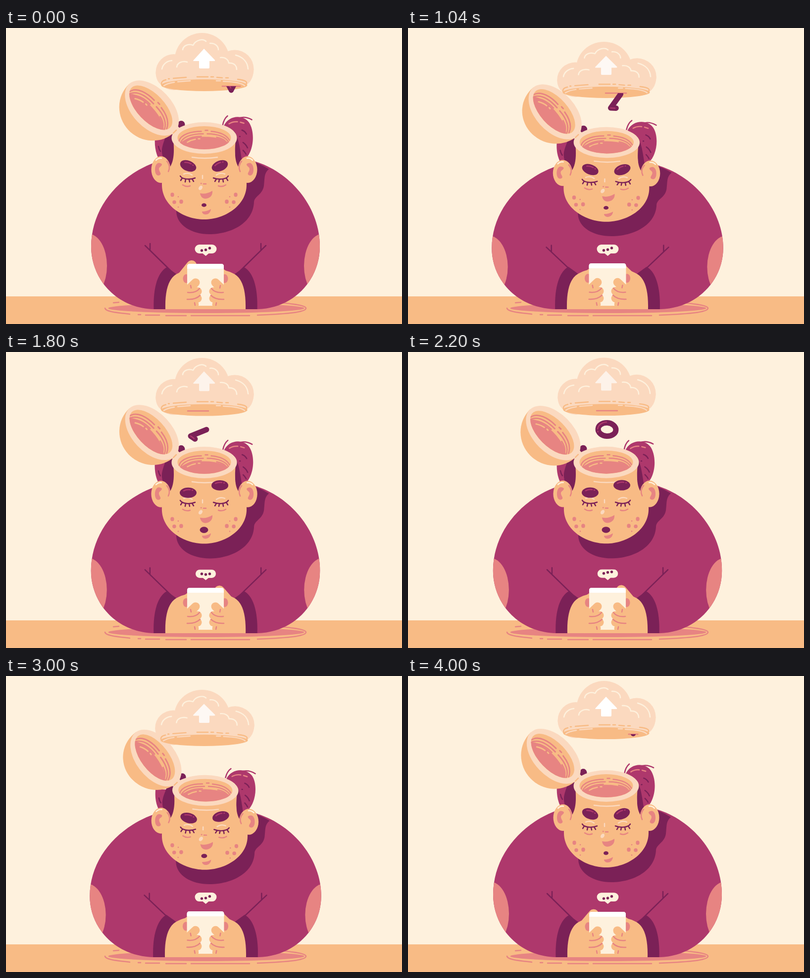
An HTML page that plays this animation: 800 px wide and 600 px high, repeating every 4040 ms.

```html
<!DOCTYPE html>
<html lang="en">
<head>
<meta charset="utf-8">
<title>Cloud thoughts</title>
<style>
html, body { margin: 0; width: 100%; height: 100%; overflow: hidden; background: #fef1dd }
svg { display: block; width: 100vw; height: 100vh }
.skin { fill: #f8bb85 } .pale { fill: #fbd9bf } .cream { fill: #fef1dd }
.pink { fill: #e78482 } .plum { fill: #ae386c } .dark { fill: #7b2157 }
.line { fill: none; stroke-width: 2.5; stroke-linecap: round; stroke-linejoin: round }
.thick { stroke-width: 11 } .finger { stroke-width: 17 } .thumb { stroke-width: 21 }
.s-skin { stroke: #f8bb85 } .s-pale { stroke: #fbd9bf } .s-cream { stroke: #fef1dd }
.s-pink { stroke: #e78482 } .s-plum { stroke: #ae386c } .s-dark { stroke: #7b2157 }
</style>
</head>
<body>
<svg viewBox="0 0 800 600">
<defs>
  <path id="torso" d="M299 570C222 568 172 508 172 443C172 360 235 290 318 267H490C570 285 634 360 634 443C634 508 584 568 508 570Z"/>
  <clipPath id="torsoClip"><use href="#torso"/></clipPath>
  <clipPath id="bowlClip"><ellipse rx="54" ry="23.5"/></clipPath>
  <clipPath id="dropClip">
    <rect id="air" width="800"/>
    <ellipse id="opening" cx="400.5" rx="54" ry="23"/>
  </clipPath>
  <g id="bowl">
    <ellipse class="skin" rx="54" ry="23.5"/>
    <g clip-path="url(#bowlClip)">
      <ellipse class="pink" cy="16" rx="51" ry="18"/>
      <path class="line s-pink" d="M-51 7C-48-7-26-13-6-13M2-15H7M14-13C36-11 46-4 51 5M-48 10C-42-3-24-8-2-8M6-8C29-8 44-1 49 9M-44 11C-38 2-22-3-6-3M25-1C36 1 42 5 45 10"/>
      <path class="line s-skin" d="M-34 9C-29 6-24 4-18 3M-12 2H-9"/>
    </g>
  </g>
  <g id="ear">
    <ellipse class="skin" cx="313" cy="287" rx="19.5" ry="27"/>
    <path class="pink" d="M315 276C306 269 301 278 301 287C301 297 306 301 311 298C315 295 309 291 309 286C309 281 315 281 315 276Z"/>
    <path class="line s-pink" d="M325 270C331 277 331 285 328 291"/>
    <path class="line s-cream" d="M303 268Q308 263 314 264"/>
  </g>
  <g id="eye">
    <path class="line s-dark" d="M352 300C356 307 372 308 382 304M356 304L353 309M363 306L362 312M370 307L371 312M376 306L379 311"/>
    <path class="line s-pale" d="M359 296Q368 292 376 298"/>
    <path class="line s-pink" d="M357 318Q364 323 372 320"/>
  </g>
  <g id="brow">
    <ellipse class="dark" rx="17" ry="10.5"/>
    <path class="line s-plum" d="M-9-4Q-3-7 4-6M8-5H9"/>
  </g>
  <g id="freckles" class="pink">
    <ellipse cx="336" cy="338" rx="3.7" ry="4.2"/><circle cx="340" cy="353" r="3.8"/>
    <ellipse cx="354" cy="352" rx="3.8" ry="4.2"/><circle cx="348" cy="342" r="1.3"/><circle cx="348" cy="363" r="1.3"/>
  </g>
  <g id="sleeve">
    <path class="dark" d="M298.5 570C297 528 306 495 325 485L350 503V570Z"/>
    <path class="skin" d="M322 570C321 530 329 505 348 497C356 493 363 491 372 490V563H403V570Z"/>
  </g>
  <g id="fingers">
    <path class="line finger s-skin" d="M358 540L383 516M358 549L387 534M358 553L387 548M358 561L381 560"/>
    <path class="line s-pink" d="M367 536Q383 538 391 528M366 550Q383 551 392 542M373 522L374 527M381 557L382 562"/>
  </g>
  <g id="drop0">
    <path class="dark" d="M-17-13H17L4 12Q0 16-4 12Z"/>
    <path class="line s-plum" d="M-7-7L-1 4"/>
  </g>
  <g id="drop1">
    <ellipse class="line thick s-dark" rx="13.5" ry="18"/>
    <path class="line s-plum" d="M-15 2C-14 11-8 18 0 19M5 18H6"/>
  </g>
  <g id="drop2">
    <path class="line thick s-dark" d="M17-9L-15 4L-6 10"/>
    <path class="line s-plum" d="M-15 4L-8 9"/>
  </g>
</defs>

<rect class="cream" width="800" height="600"/>
<rect class="skin" y="544" width="800" height="56"/>
<ellipse class="pink" cx="404.5" cy="568" rx="198" ry="10"/>
<path class="line s-pink" d="M200 568C201 575 225 577 250 580M267 581H272M282 582H310M323 583H364M374 583H492M508 582C560 580 606 577 606 568C606 562 580 559 545 556M217 557L228 556"/>

<g id="body">
  <use href="#torso" class="plum"/>
  <g class="pink" clip-path="url(#torsoClip)">
    <ellipse cx="166" cy="482" rx="38" ry="65"/><ellipse cx="640" cy="482" rx="38" ry="65"/>
  </g>
  <path class="dark" d="M344 372C345 400 375 418 411 418C455 418 500 395 501 352C503 340 518 338 521 320C523 303 521 295 531 286C515 276 500 270 480 266L344 300Z"/>
  <path class="line s-dark" d="M281 441L342 501M291 437V450M525 441L463 502M515 437V450"/>
  <g id="head">
    <g id="hair">
      <path class="plum" d="M440 199C450 176 479 175 491 191C503 208 502 246 485 264L472 272L462 215Z"/>
      <path class="line s-plum" d="M438 197C440 187 443 182 448 178M468 184C478 179 488 181 497 186"/>
      <path class="line s-pink" d="M451 194Q459 189 468 190M474 191L481 193"/>
      <path class="line s-dark" d="M477 207Q483 209 486 215M472 220H473M479 232Q485 236 488 243M479 248Q483 252 485 256"/>
    </g>
    <path class="dark" d="M460 208C470 222 472 240 476 265L478 282H464Z"/>
    <path class="plum" d="M301 222C299 248 306 270 325 284L340 280V222Z"/>
    <path class="dark" d="M340 215V275L331 284C322 275 314 262 315 246C316 236 321 226 324 215Z"/>
    <path class="line s-dark" d="M308 240Q309 246 312 250"/>
    <ellipse class="dark" cx="354" cy="196" rx="7.5" ry="8"/>
    <g id="lid">
      <g transform="translate(295 162) rotate(47)">
        <path class="skin" d="M-67 0A67 65 0 0 0 67 0Z"/>
        <ellipse class="pale" rx="67" ry="40"/>
        <use href="#bowl" transform="translate(-2 1) scale(1.04 1.18)"/>
      </g>
    </g>
    <path class="skin" d="M338 225C340 250 340 270 330 284L315 305V318C315 360 359 388 400.5 388C442 388 486 360 486 318V305L471 284C461 270 462 250 464 225Z"/>
    <use href="#ear"/><use href="#ear" transform="matrix(-1 0 0 1 801 0)"/>
    <path class="pale" d="M331 207L347 199L360 212L343 224Z"/>
    <ellipse class="pale" cx="400.5" cy="223" rx="66" ry="32"/>
    <path class="line s-skin" d="M338 213L344 207"/>
    <use href="#bowl" x="400.5" y="222.5"/>
    <path class="line s-pale" d="M376 262Q401 266 427 262"/>
    <use href="#eye"/><use href="#eye" transform="matrix(-1 0 0 1 801 0)"/>
    <use href="#freckles"/><use href="#freckles" transform="matrix(-1 0 0 1 800 0)"/>
    <use id="browL" href="#brow"/><use id="browR" href="#brow"/>
    <path class="line s-pale" d="M397 299V305"/>
    <path class="line s-pink" d="M394 315H394.5M399 316H404"/>
    <ellipse class="pale" transform="translate(393 324) rotate(35)" rx="3.5" ry="5"/>
    <path class="pink" d="M392 335Q404 338 417 330C418 341 410 346 402 346C396 345 393 341 392 335Z"/>
    <ellipse id="mouth" class="dark" cx="400"/>
    <path class="pink" d="M396 372Q406 372 414 367C413 375 408 378 403 378C399 378 396 375 396 372Z"/>
  </g>
</g>

<g id="arms">
  <use href="#sleeve"/><use href="#sleeve" transform="matrix(-1 0 0 1 806 0)"/>
  <path id="thumbL" class="line thumb s-skin"/>
  <path id="thumbR" class="line thumb s-skin"/>
  <ellipse class="pink" cx="364" cy="508" rx="6.5" ry="9"/><ellipse class="pink" cx="442" cy="508" rx="6.5" ry="9"/>
  <rect class="cream" x="366" y="478" width="74" height="85" rx="5"/>
  <path fill="#fff" d="M366 488V483Q366 478 371 478H435Q440 478 440 483V488Z"/>
  <use href="#fingers"/><use href="#fingers" transform="matrix(-1 0 0 1 806 0)"/>
</g>

<g id="bubble">
  <path class="cream" d="M-13-9H13A9 9 0 0 1 13 9H6L0 14L-6 9H-13A9 9 0 0 1-13-9Z"/>
</g>
<g id="dots" class="dark"><circle r="2.7"/><circle r="2.7"/><circle r="2.7"/></g>

<g id="cloud">
  <g class="pale">
    <circle cx="396" cy="65.5" r="55.5"/><circle cx="339" cy="89.5" r="36.5"/><circle cx="462" cy="83" r="38.5"/>
    <path d="M302.5 90C303 108 311 118 330 121H472C492 117 500 102 500.5 83L420 60H370Z"/>
  </g>
  <ellipse class="skin" cx="400.5" cy="116" rx="87" ry="12"/>
  <path class="line s-skin" d="M314 114Q313 107 323 105M328 103H330M338 102L364 100M386 99H408M414 99H419M426 100L437 101M444 101H449M468 104C486 106 488 110 485 114"/>
  <path class="line s-pale" d="M319 117Q326 112 340 110M347 109L372 107M425 107H433M439 108C462 109 477 112 482 117"/>
  <path class="line s-cream" d="M315 83C317 73 325 67 335 66M345 79C346 70 357 66 366 69M357 44C358 36 368 31 378 35C383 24 398 21 404 27M412 31C422 30 429 37 429 44M433 60C443 59 449 64 450 71C460 70 466 76 466 84M464 55C479 59 488 69 489 83"/>
  <path id="arrow" fill="#fff" d="M400 0L422 23Q423 25 420 25H411V38Q411 40 409 40H392Q390 40 390 38V25H380Q377 25 379 23Z"/>
</g>
<g id="slits" class="line s-pink"></g>
<g clip-path="url(#dropClip)"><g id="drops"></g></g>
</svg>

<script>
const LOOP = 4040, STEP = 40, TAU = 2 * Math.PI;
const $ = id => document.getElementById(id);
const set = (el, attrs) => { for (const k in attrs) el.setAttribute(k, attrs[k]); };
const move = (el, transform) => set(el, { transform });
const mod = (a, b) => (a % b + b) % b;
const wave = (t, cycles, peak = 0) => Math.cos(TAU * (t * cycles / LOOP - peak));
const smooth = (a, b, t) => { const u = Math.min(1, Math.max(0, (t - a) / (b - a))); return u * u * (3 - 2 * u); };
const scaleAt = (x, y, sx, sy) => `translate(${x} ${y}) scale(${sx} ${sy}) translate(${-x} ${-y})`;

// start, x, shape, strength of the lid kick, angle at start
const drops = [
  [3980, 455, 0, 13, 0], [536, 386, 1, 8, -40], [910, 420, 2, 13, -83], [1587, 388, 2, 13, -83],
  [1985, 402, 1, 13, 10], [2535, 440, 0, 13, 0], [3115, 427, 2, 13, -83], [3345, 409, 1, 5, -105]
].map(([start, x, shape, kick, angle]) => ({ start, x, shape, kick, angle }));
const IMPACT = 270, GONE = 440, BOTTOM = [14, 23.5, 14];

const make = (name, parent, attrs) => {
  const el = document.createElementNS("http://www.w3.org/2000/svg", name);
  set(el, attrs);
  return parent.appendChild(el);
};
for (const d of drops) {
  d.el = make("use", $("drops"), { href: "#drop" + d.shape });
  d.slit = make("path", $("slits"), {});
}

function lidAngle(t) {
  return drops.reduce((sum, d) => {
    const u = mod(t - d.start - IMPACT, LOOP);
    return sum + d.kick * Math.exp(-u / 260) * Math.sin(TAU * u / 600);
  }, 0);
}

function drawDrops(t, sink) {
  const slitY = 118 + 14 * sink;
  set($("air"), { y: slitY, height: 229 - slitY });
  set($("opening"), { cy: 222.5 + 9 * sink });
  for (const d of drops) {
    const u = mod(t - d.start + 60, LOOP) - 60;
    const falling = u >= 0 && u < GONE;
    d.el.style.display = falling ? "" : "none";
    if (falling) {
      const y = slitY + .2 * u + .0004 * u * u - BOTTOM[d.shape];
      const turn = d.shape ? d.angle + .39 * u : 0;
      move(d.el, `translate(${d.x} ${y}) rotate(${turn})`);
    }
    const half = 21 * smooth(-40, 90, u) * (1 - smooth(230, 310, u));
    d.slit.style.display = half > .3 ? "" : "none";
    set(d.slit, { d: `M${d.x - half} ${slitY}H${d.x + half}` });
  }
}

function draw(t) {
  const sink = (1 - wave(t, 2)) / 2;
  const wide = 1 + .012 * sink;
  const tilt = lidAngle(t);
  const awe = smooth(1050, 1350, t) * (1 - smooth(2800, 3100, t));

  move($("body"), scaleAt(403, 570, wide, 1 - .026 * sink));
  move($("arms"), scaleAt(403, 570, wide, wide));
  move($("head"), `rotate(${Math.max(0, tilt) * .13} 400 388)`);
  move($("lid"), `rotate(${tilt} 345 214)`);
  move($("hair"), `rotate(${2 * Math.tanh(tilt / 2)} 480 262)`);
  move($("browL"), `translate(368 ${279.5 + 5 * awe}) rotate(${22 * (1 - awe)})`);
  move($("browR"), `translate(432 ${279.5 - 10 * awe}) rotate(${-22 * (1 - awe)})`);
  set($("mouth"), { cy: 359 + awe, rx: 5 + 3.5 * awe, ry: 3.7 + 2.6 * awe });

  const left = Math.max(0, wave(t, 3)) ** 8;
  const right = (1 - wave(t, 3)) / 2;
  set($("thumbL"), { d: `M349 514L375 ${495.5 - 14 * left}` });
  set($("thumbR"), { d: `M456 513L431 ${495.5 - 15 * right}` });

  const puff = 1 + .035 * (wave(t, 8) - 1);
  move($("bubble"), `translate(403.5 ${448.8 - .8 * wave(t, 8)}) scale(${puff})`);
  [.45, .33, .12].forEach((peak, i) =>
    set($("dots").children[i], { cx: 395.5 + 8 * i, cy: 448.3 - 2.8 * wave(t, 4, peak) }));

  move($("cloud"), `translate(0 ${14 * sink}) ` + scaleAt(401.5, 128, wide, 1 - .034 * sink));
  set($("arrow"), { transform: `translate(0 ${39 + 3 * wave(t, 3)})`, opacity: .8 + .2 * wave(t, 3) });
  drawDrops(t, sink);
}

const begin = performance.now();
function tick() {
  const t = (performance.now() - begin) % LOOP;
  draw(Math.floor(t / STEP) * STEP);
  requestAnimationFrame(tick);
}
tick();
</script>
</body>
</html>
```
